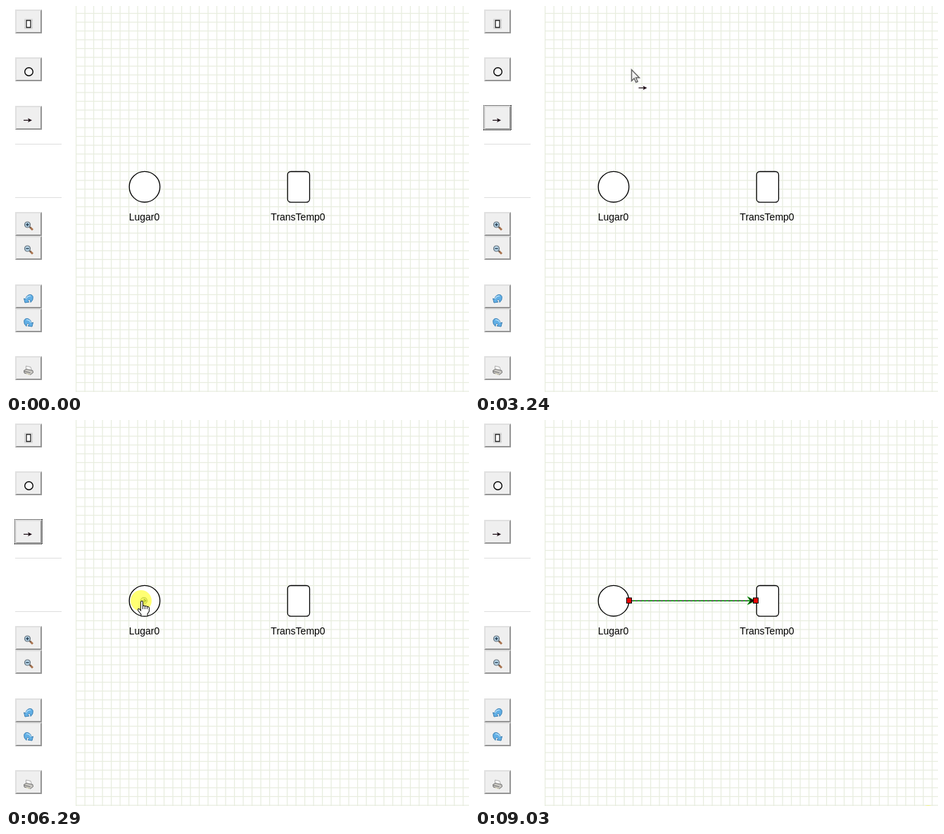
Recreate the animation shown at these times as an HTML page with a canvas. Size 658 px wide and 549 px high, loop 9180 ms.

```html
<!DOCTYPE html>
<html lang="es">
<head>
<meta charset="utf-8">
<title>Editor de redes</title>
<style>
html, body { margin: 0; width: 100%; height: 100%; overflow: hidden; background: #fff; }
canvas { display: block; }
</style>
</head>
<body>
<canvas id="stage" width="658" height="549"></canvas>
<script>
const ctx = document.getElementById('stage').getContext('2d');
const LOOP = 9180;

const ARROW = new Path2D('M.5 .5V16.5L4.2 13L6.8 18.5L9.2 17.5L6.7 12.1H11.6Z');
const HAND = new Path2D('M-1.5 14V1.5Q0 -.6 1.5 1.5V7.5Q3 6 4.5 8Q6 6.6 7.5 8.7' +
  'Q9.2 7.8 10.5 10V15L8 19V22H-1V19.5L-5.3 14Q-6 11 -3.8 11.5Z');
const FINGERS = new Path2D('M1.5 7.5V12M4.5 8V12M7.5 8.7V12');
const MOVE = new Path2D('M0 -11L4.5 -6.5H1.8V-1.8H6.5V-4.5L11 0L6.5 4.5V1.8H1.8V6.5H4.5' +
  'L0 11L-4.5 6.5H-1.8V1.8H-6.5V4.5L-11 0L-6.5 -4.5V-1.8H-1.8V-6.5H-4.5Z');

function at(x, y, draw) {
  ctx.save();
  ctx.translate(x, y);
  draw();
  ctx.restore();
}

function paint(path, fill, stroke, width = 1) {
  ctx.lineWidth = width;
  if (fill) { ctx.fillStyle = fill; ctx.fill(path); }
  if (stroke) { ctx.strokeStyle = stroke; ctx.stroke(path); }
}

function shape(d, fill, stroke, width) {
  paint(new Path2D(d), fill, stroke, width);
}

function disc(x, y, r, fill, stroke, width) {
  const p = new Path2D();
  p.arc(x, y, r, 0, Math.PI * 2);
  paint(p, fill, stroke, width);
}

function box(x, y, w, h, color) {
  ctx.fillStyle = color;
  ctx.fillRect(x, y, w, h);
}

function line(x1, y1, x2, y2, color, width, dash = []) {
  ctx.setLineDash(dash);
  shape(`M${x1} ${y1}L${x2} ${y2}`, null, color, width);
  ctx.setLineDash([]);
}

// Toolbar icons, centred on the origin
function lens(plus) {
  line(2, 2, 6, 6, '#a9744f', 2.8);
  line(1.5, 1.5, 3, 3, '#555', 1.6);
  disc(-1.5, -1.5, 4, '#b9d7ea', '#66727c', 1.2);
  line(-3.7, -1.5, .7, -1.5, '#243c50', 1.4);
  if (plus) line(-1.5, -3.7, -1.5, .7, '#243c50', 1.4);
}

function turn(dir) {
  ctx.scale(dir, 1);
  shape('M-6.5 .5L-5 6.5L1 5.5L-1 3.8Q1 .5 2.5 3L3 6Q7 3 6.3 -2Q5 -6 0 -4.5Q-3.5 -3 -4.3 1.5Z',
    '#62b0e6', '#3378ad', .9);
  shape('M-3.5 1Q-1.5 -3.5 3 -3', null, '#b8e1fa', 1.3);
}

const icons = {
  transition() {
    ctx.setLineDash([1, 1]);
    shape('M-5.5 -6.5H5.5V6.5H-5.5Z', null, '#aaa', 1);
    ctx.setLineDash([]);
    shape('M-3 -5H3V5H-3Z', '#fff', '#222', 1.3);
  },
  place() { disc(.5, 0, 5.8, '#f8f8f8', '#000', 1.4); },
  arc() {
    line(-7, 0, 2, 0, '#1c0a14', 1.2);
    shape('M5 0L-1 -3L.5 0L-1 3Z', '#1c0a14');
  },
  zoomIn() { lens(true); },
  zoomOut() { lens(false); },
  undo() { turn(1); },
  redo() { turn(-1); },
  print() {
    shape('M-3.5 -6.5L3 -5L4.5 0L-3.5 -1Z', '#fff', '#999', .8);
    shape('M-6.5 0L-3 -2L6 0L6.5 3L2.5 6L-6 3.5Z', '#cbc9c4', '#666', .9);
    line(-6, 1, 2.5, 3.2, '#666', .9);
    line(-3.5, 4.5, 2, 6, '#ece8cc', 1.2);
  }
};

const buttons = [
  [5, 'transition'], [73, 'place'], [142, 'arc'], [293, 'zoomIn'],
  [327, 'zoomOut'], [396, 'undo'], [430, 'redo'], [498, 'print']
];

function button(y, icon, focused, pressed) {
  const light = '#e0e0e0', dark = '#969696';
  box(13, y, 38, 34, pressed ? dark : light);
  shape(`M51 ${y}V${y + 34}H13L15 ${y + 32}H49V${y + 2}Z`, pressed ? light : dark);
  box(15, y + 2, 34, 30, '#efefef');
  const drop = icon === 'zoomIn' || icon === 'zoomOut' || icon === 'undo' || icon === 'redo' ? 19.5 : 20.5;
  at(pressed ? 33 : 32, y + drop, icons[icon]);
  if (focused) {
    ctx.setLineDash([1, 1]);
    shape(`M12 ${y - .5}H52M12 ${y + 34.5}H52M12.5 ${y - 1}V${y + 35}M51.5 ${y - 1}V${y + 35}`, null, '#000', 1);
    ctx.setLineDash([]);
  }
}

function scene(focused, pressed) {
  box(0, 0, 658, 549, '#fff');
  for (let x = 99; x < 658; x += 12.5) box(x, 0, 1.25, 549, '#e8eddf');
  for (let y = 9.9; y < 549; y += 12.5) box(99, y, 559, 1.25, '#e8eddf');
  box(13, 196, 66, 1, '#dedede');
  box(13, 272, 66, 1, '#dedede');
  for (const [y, icon] of buttons) {
    const active = icon === 'arc';
    button(y, icon, active && focused, active && pressed);
  }
  disc(197, 257.2, 21.8, '#fff', '#000', 1.3);
  const r = new Path2D();
  r.roundRect(400.2, 235.5, 31.3, 43.6, 4.5);
  paint(r, '#fff', '#000', 1.3);
  ctx.font = '14px "Liberation Sans", Arial, sans-serif';
  ctx.textAlign = 'center';
  ctx.fillStyle = '#000';
  ctx.fillText('Lugar0', 196.5, 305);
  ctx.fillText('TransTemp0', 415, 305);
}

function handle(x) {
  box(x - 4, 252.5, 8, 8.5, '#000');
  box(x - 3, 253.5, 6, 6.5, '#e80000');
}

function edge() {
  line(219, 257.1, 396, 257.1, '#000', 1.3);
  line(219, 257.1, 396, 257.1, '#00d000', 1.3, [3, 3]);
  shape('M398 257L387.5 251.5L391 257L387.5 262.5Z', '#111', '#14a814', .9);
  handle(219);
  handle(399);
}

// Pointers
const glow = (x, y) => disc(x, y, 15, 'rgba(255,255,0,.55)');

const pointer = ([x, y]) => at(x, y, () => paint(ARROW, '#fff', '#14142c', 1));

const hand = ([x, y]) => at(x, y, () => {
  paint(HAND, '#fff', '#1c1c1c', 1.1);
  paint(FINGERS, null, '#1c1c1c', 1);
});

const carrier = ([x, y]) => at(x, y, () => {
  paint(ARROW, '#f1f1f1', '#666', 1.5);
  at(17.5, 26.5, icons.arc);
});

function connector(x, y) {
  disc(x, y, 4.5, '#e3ebdf', '#829982', 1.2);
  shape('M-2.5 0H2M0 -2.5L2.7 0L0 2.5'.replace(/^/, ''), null, 'transparent', 1);
  at(x, y, () => shape('M-2.5 0H2M0 -2.5L2.7 0L0 2.5', null, '#5c805c', 1.2));
}

// Motion is sampled at a fixed rhythm, so positions hold between samples
function sample(t, start, end, n) {
  const i = Math.floor((t - start) / (end - start) * (n - 1) + 1e-6);
  return Math.max(0, Math.min(1, i / (n - 1)));
}
const smooth = p => p * p * (3 - 2 * p);
const easeOut = p => 1 - (1 - p) * (1 - p);
const mix = (a, b, p) => a.map((v, i) => Math.round(v + (b[i] - v) * p));

const REST = [244, 427], TOOL = [27, 166], SOURCE = [193, 257], DROP = [423, 272];

function drag(t) {
  const p = sample(t, 6290, 6920, 9);
  const pos = mix(SOURCE, DROP, smooth(p));
  const over = pos[0] >= 400;
  if (over) {
    const r = new Path2D();
    r.roundRect(399, 234.5, 33.5, 45.5, 4);
    paint(r, null, '#00e000', 3);
  }
  if (pos[0] > 221) {
    const end = over ? [399, 257] : pos;
    line(219, 257, end[0], end[1], '#00d800', 1.2, [3, 3]);
  }
  connector(pos[0] + 3, pos[1]);
  glow(pos[0] - 1, pos[1]);
  hand(pos);
}

function cursor(t) {
  if (t < 300) return;
  if (t < 1390) return pointer(mix([444, 538], REST, easeOut(sample(t, 300, 690, 6))));
  if (t < 2580) {
    const p = sample(t, 1390, 2180, 11);
    const pos = mix([228, 422], TOOL, smooth(p));
    return p > .94 ? hand(pos) : pointer(pos);
  }
  if (t < 2920) {
    if (t < 2750) glow(...TOOL);
    return hand(TOOL);
  }
  if (t < 2995) return hand([40, 161]);
  if (t < 3070) return pointer([81, 144]);
  if (t < 3240) return;
  if (t < 5330) return carrier(mix([222, 90], [262, 138], easeOut(sample(t, 3240, 3800, 8))));
  if (t < 5480) return;
  if (t < 5560) return carrier([256, 220]);
  if (t < 5730) return;
  if (t < 6290) {
    connector(196, 257);
    return hand(t < 5810 ? [198, 258] : SOURCE);
  }
  if (t < 7330) return drag(t);
  if (t < 7480) return at(423.5, 271.5, () => paint(MOVE, '#fff', '#111', 1.1));
  if (t < 7790) {
    const p = sample(t, 7480, 7712, 4);
    return pointer(mix([426, 284], [470, 423], p * (.6 + .4 * p)));
  }
  if (t >= 9030) glow(644, 563.2);
}

function frame(now) {
  const t = now % LOOP;
  scene(t >= 2580 && t < 9030, t >= 2580 && t < 2750);
  if (t >= 7330) edge();
  cursor(t);
  requestAnimationFrame(start);
}

let origin = null;
function start(now) {
  if (origin === null) origin = now;
  frame(now - origin);
}
requestAnimationFrame(start);
</script>
</body>
</html>
```
